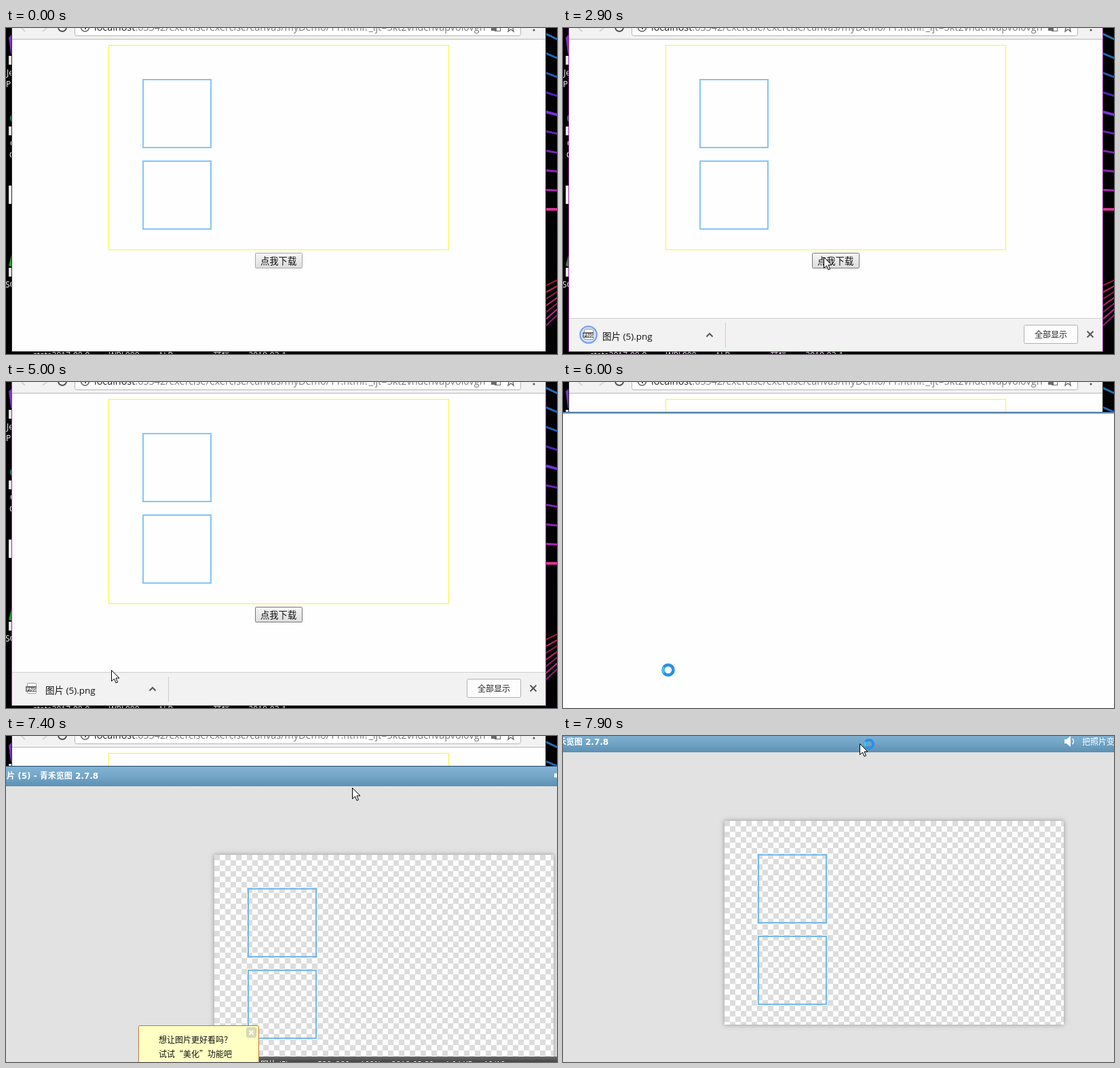
An HTML page with a canvas for the animation above (8000 ms loop, 812x480 px).

```html
<!DOCTYPE html>
<html lang="zh">
<head>
<meta charset="utf-8">
<title>Canvas download</title>
<style>
html, body { margin: 0; width: 100%; height: 100%; overflow: hidden; background: #000; }
canvas { display: block; }
</style>
</head>
<body>
<canvas id="stage" width="812" height="480"></canvas>
<script>
const ctx = document.getElementById('stage').getContext('2d');
const LOOP = 8000, STEP = 100;
const CJK = '"Noto Sans CJK SC", "Noto Sans CJK", sans-serif';
const UI = '"Open Sans", ' + CJK;
const GAP = ' '.repeat(5);
const YELLOW = '#fbf32c';

// Pointer moves, each easing out from the place before it
const ENTRY = { x: 716, y: 191 };
const MOVES = [
  { from: 100, to: 200, x: 497, y: 408 },
  { from: 200, to: 300, x: 467, y: 421 },
  { from: 300, to: 500, x: 428, y: 305 },
  { from: 500, to: 900, x: 384, y: 337 },
  { from: 2900, to: 3700, x: 131, y: 402 },
  { from: 3700, to: 4100, x: 128, y: 466 },
  { from: 4300, to: 4600, x: 155, y: 424 },
  { from: 6400, to: 6700, x: 246, y: 380 },
  { from: 6900, to: 7400, x: 510, y: 76 },
  { from: 7500, to: 7700, x: 506, y: 61 }
];

const clamp = v => Math.max(0, Math.min(1, v));
const ramp = (t, a, b) => clamp((t - a) / (b - a));
const easeOut = p => 1 - (1 - p) * (1 - p);

function rect(x, y, w, h, color) {
  ctx.fillStyle = color;
  ctx.fillRect(x, y, w, h);
}

function frame(x, y, w, h, color, line = 1) {
  ctx.strokeStyle = color;
  ctx.lineWidth = line;
  ctx.strokeRect(x + line / 2, y + line / 2, w - line, h - line);
}

function panel(x, y, w, h, r, fill, stroke) {
  ctx.beginPath();
  ctx.roundRect(x + 0.5, y + 0.5, w - 1, h - 1, r);
  ctx.fillStyle = fill;
  ctx.fill();
  ctx.strokeStyle = stroke;
  ctx.lineWidth = 1;
  ctx.stroke();
}

function text(s, x, y, size, color, family = UI, weight = '') {
  ctx.font = `${weight} ${size}px ${family}`;
  ctx.fillStyle = color;
  ctx.fillText(s, x, y);
}

function poly(pts, color, line) {
  ctx.beginPath();
  pts.forEach(([x, y]) => ctx.lineTo(x, y));
  if (line) {
    ctx.strokeStyle = color;
    ctx.lineWidth = line;
    ctx.stroke();
  } else {
    ctx.fillStyle = color;
    ctx.fill();
  }
}

function arc(x, y, r, color, line, a = 0, b = Math.PI * 2) {
  ctx.beginPath();
  ctx.arc(x, y, r, a, b);
  ctx.strokeStyle = color;
  ctx.lineWidth = line;
  ctx.stroke();
}

function disc(x, y, r, color) {
  ctx.beginPath();
  ctx.arc(x, y, r, 0, Math.PI * 2);
  ctx.fillStyle = color;
  ctx.fill();
}

function cross(x, y, r, color, line) {
  poly([[x - r, y - r], [x + r, y + r]], color, line);
  poly([[x + r, y - r], [x - r, y + r]], color, line);
}

function vertical(y0, y1, ...colors) {
  const g = ctx.createLinearGradient(0, y0, 0, y1);
  colors.forEach((c, i) => g.addColorStop(i / (colors.length - 1), c));
  return g;
}

function clipped(x, y, w, h, draw) {
  ctx.save();
  ctx.beginPath();
  ctx.rect(x, y, w, h);
  ctx.clip();
  draw();
  ctx.restore();
}

// The two outlined squares, in the page and in the saved picture
function squares(x, y, color) {
  for (const dy of [0, 120]) frame(x + 49, y + 49 + dy, 102, 102, color, 2);
}

function streaks() {
  for (let i = 0; i < 10; i++) {
    const y = 267 - 28.8 * i;
    const hue = 325 - 55 * Math.sqrt(i / 4) - (i > 6 ? 35 : 0);
    poly([[794, y], [813, y + i]], `hsl(${hue}, 65%, ${i % 5 ? 42 : 52}%)`, 2 + (i % 5 ? 1 : 2));
  }
  for (let i = 0; i < 7; i++) {
    const y = 380 + 10 * i;
    poly([[794, y], [813, y - 9 - 1.5 * i]], `hsl(${345 - 5 * i}, 66%, ${i % 2 ? 46 : 36}%)`, 2);
  }
}

function desktop() {
  rect(0, 0, 812, 480, '#020104');
  poly([[4, 14], [9, 9], [9, 41], [7, 37]], '#7a35c8');
  disc(15, 133, 9, '#1f8a58');
  poly([[4, 350], [9, 330], [9, 352]], '#2f9a2c');
  for (let i = 0; i < 4; i++) {
    const y = 41 + 104 * i;
    if (i === 2) rect(4, 232, 5, 27, '#ececec');
    else rect(4, y, 5, 13, '#e4e4e4');
    text(['Je', 'C', '', 'SC'][i], [1, 6, 0, -1][i], y + 29, 12, '#fff');
  }
  text('Pl', 0, 87, 12, '#fff');
  text('C', 5, 191, 12, '#fff');
  text(['state2017-08-0', 'WPL000', 'ALB' + GAP + GAP, '文档', '2018-03-1'].join(GAP + '    '), 40, 486, 12, '#eee');
  streaks();
}

function toolbar() {
  rect(9, 0, 786, 16, '#f2f2f2');
  rect(9, 16, 786, 1, '#b9b9b9');
  poly([[28, -3], [23, 0], [28, 5]], '#d4d4d4', 2);
  poly([[54, -3], [60, 0], [54, 5]], '#d4d4d4', 2);
  arc(83, -1, 6, '#555', 2, 0, Math.PI);
  panel(101, -20, 658, 32, 3, '#fff', '#b4b4b4');
  arc(116.5, -1, 6, '#5a5a5a', 1.5);
  rect(116, -2, 2, 4, '#5a5a5a');
  clipped(125, 0, 585, 12, () => {
    text('localhost', 130, 4, 14.4, '#222');
    const w = ctx.measureText('localhost').width;
    text(':63342/exercise/exercise/canvas/myDemo/11.html?_ijt=5kt2vhdchvapvol0vgn', 130 + w, 4, 14.4, '#7a7a7a');
  });
  rect(715, 0, 8, 4, '#6a6a6a');
  frame(720, -3, 9, 8, '#6a6a6a');
  poly([[741, 0], [740, 5], [744, 2], [748, 5], [747, 0]], '#666', 1.4);
  disc(778, 3, 1.6, '#555');
}

function page(t) {
  rect(9, 17, 786, 459, '#fefefe');
  frame(151, 25, 502, 302, YELLOW);
  squares(152, 26, '#85c5f4');
  const lit = t >= 800;
  panel(367, 331, 70, 23, 1, vertical(331, 354, '#f7f7f7', '#dcdcdc'), lit ? '#777' : '#a6a6a6');
  text('点我下载', 375, 347.5, 13.3, '#111', CJK);
}

function startArrow(t) {
  const p = ramp(t, 1800, 2600);
  if (p <= 0 || p >= 1) return;
  ctx.save();
  ctx.globalAlpha = Math.sin(p * Math.PI) * 0.75;
  ctx.translate(45, 382 + 20 * p);
  rect(-5, 0, 10, 14, '#4285f4');
  poly([[-16, 13], [16, 13], [0, 29]], '#4285f4');
  rect(-16, 34, 32, 5, '#4285f4');
  ctx.restore();
}

function fileItem(t) {
  const hover = ramp(t, 3800, 4100) * (1 - ramp(t, 4600, 5000));
  if (hover) rect(13, 429, 226, 47, `rgba(0,0,0,${0.09 * hover})`);

  const ring = ramp(t, 1900, 2700) * (1 - ramp(t, 2900, 3700));
  ctx.globalAlpha = ring;
  disc(37.5, 451.5, 12.5, '#d3e0fa');
  arc(37.5, 451.5, 12.3, '#6f9df0', 2);
  ctx.globalAlpha = 1;

  panel(31, 443, 14, 16, 1, '#fafafa', '#999');
  rect(29, 448, 16, 8, '#666');
  text('PNG', 30, 455, 7, '#fff', UI, 'bold');
  text('图片 (5).png', 58, 458.5, 13.5, '#111');
  poly([[211.5, 454.5], [216, 450], [220.5, 454.5]], '#555', 2);
}

function shelf(t) {
  if (t < 1800) return;
  const drop = 34 * (1 - easeOut(ramp(t, 1800, 2100)));
  const top = 428 + Math.round(drop);
  clipped(9, top - 1, 786, 477 - top, () => {
    rect(9, top, 786, 48, '#f2f2f2');
    rect(9, top - 1, 786, 1, '#cfcfcf');
    ctx.translate(0, Math.round(drop * 0.76));
    panel(679, 437, 80, 28, 2, '#fdfdfd', '#b0b0b0');
    text('全部显示', 695, 455.5, 12, '#222', CJK);
    cross(777, 451, 4.5, '#555', 2);
    const w = 231 * easeOut(ramp(t, 1800, 2600));
    clipped(9, 420, w, 60, () => fileItem(t));
    if (w) rect(Math.round(8 + w), 434, 1, 37, '#cdcdcd');
  });
}

function browser(t) {
  page(t);
  toolbar();
  shelf(t);
  startArrow(t);
  const active = t >= 1500 && t < 5500;
  frame(8, -2, 788, 479, active ? '#a02cae' : '#2c2c2c');
}

function picture(x, y) {
  ctx.save();
  ctx.shadowColor = 'rgba(0,0,0,.35)';
  ctx.shadowBlur = 7;
  rect(x, y, 500, 300, '#fefefe');
  ctx.restore();
  clipped(x, y, 500, 300, () => {
    for (let r = 0; r < 38; r++)
      for (let c = r % 2; c < 63; c += 2) rect(x + c * 8, y + r * 8, 8, 8, '#dcdcdc');
  });
  squares(x, y, '#76b8ec');
}

function statusBar() {
  rect(300, 472, 512, 30, vertical(472, 482, '#6a6a6a', '#3c3c3c'));
  text('图片 (5)', 375, 488, 12, '#fff');
  text(['500x300', '100%', '2018-03-29', '4.64 KB', '10/10'].join(GAP), 459, 488, 12, '#fff');
}

function tip() {
  panel(195, 426, 178, 70, 2, '#ffffc4', '#bd7a36');
  panel(354, 429, 15, 15, 2, '#d9d9b8', '#cfcfb0');
  cross(361.5, 436.5, 3, '#fff', 2);
  text('想让图片更好看吗？', 225, 452, 12, '#111', CJK);
  text('试试“美化”功能吧', 225, 473, 12, '#111', CJK);
}

function viewerBody(t) {
  rect(-20, 74, 920, 480, '#e2e2e2');
  rect(-20, 44, 920, 30, vertical(44, 74, '#84b4d6', '#74a6c8', '#5c90b2'));
  rect(-20, 44, 920, 1, '#1f4260');
  text('图片 (5) - 青禾览图 2.7.8', -11, 63, 12, '#fff', '"DejaVu Sans", ' + CJK, 'bold');
  rect(808, 55, 4, 6, '#fff');
  poly([[811, 55], [817, 50], [817, 66], [811, 61]], '#fff');
  arc(817, 58, 4.5, '#fff', 1.5, -1, 1);
  text('把照片变漂亮', 834, 63, 12, '#fff', CJK);
  picture(307, 175);
  if (t >= 7000 && t < 7700) {
    statusBar();
    tip();
  }
}

// How far the viewer window has been dragged
function drag(t) {
  const p = ramp(t, 7700, 7900);
  return { x: Math.round(-69 * p), y: -50 * p };
}

function viewer(t) {
  if (t < 5700) return;
  ctx.save();
  if (t < 6200) {
    const p = easeOut(ramp(t, 5600, 6000));
    const s = 0.92 + 0.08 * p;
    ctx.globalAlpha = p;
    ctx.translate(406 * (1 - s), 300 * (1 - s));
    ctx.scale(s, s);
    rect(-40, 44, 900, 560, '#fefefe');
    rect(-40, 44, 900, 1, '#27547c');
    rect(-40, 45, 900, 2, '#7fb2d8');
  } else {
    const d = drag(t);
    ctx.translate(d.x, d.y);
    viewerBody(t);
  }
  ctx.restore();
}

function pointerAt(t) {
  let { x, y } = ENTRY;
  for (const m of MOVES) {
    const p = easeOut(ramp(t, m.from, m.to));
    x += (m.x - x) * p;
    y += (m.y - y) * p;
  }
  const d = drag(t);
  return [Math.round(x + d.x), Math.round(y + d.y)];
}

function spinner(x, y, r, line, t) {
  arc(x, y, r, '#2a8fe8', line);
  const a = Math.PI + t / 1000 * Math.PI * 2;
  arc(x, y, r, '#45c4f4', line * 0.8, a - 0.6, a + 0.6);
}

function pointer(t) {
  if (t < 100) return;
  const [x, y] = pointerAt(t);
  if (t >= 5500 && t < 6200) {
    disc(x, y, 6, '#fff');
    spinner(x, y, 7.5, 4.6, t);
    return;
  }
  if (t >= 7800) spinner(x + 14, y + 1, 6, 4, t + STEP);
  const shape = [[0, 0], [0, 16], [4, 12.5], [6.5, 18.5], [9, 17.5], [6.5, 11.5], [11.5, 11.5], [0, 0], [0, 3]]
    .map(([a, b]) => [x + 0.5 + a, y + 0.5 + b]);
  poly(shape, '#fff');
  poly(shape, '#000', 1);
}

function draw(now) {
  const t = Math.floor((now % LOOP) / STEP) * STEP;
  desktop();
  browser(t);
  viewer(t);
  pointer(t);
}

const start = performance.now();
function tick() {
  draw(performance.now() - start);
  requestAnimationFrame(tick);
}
tick();
</script>
</body>
</html>
```
